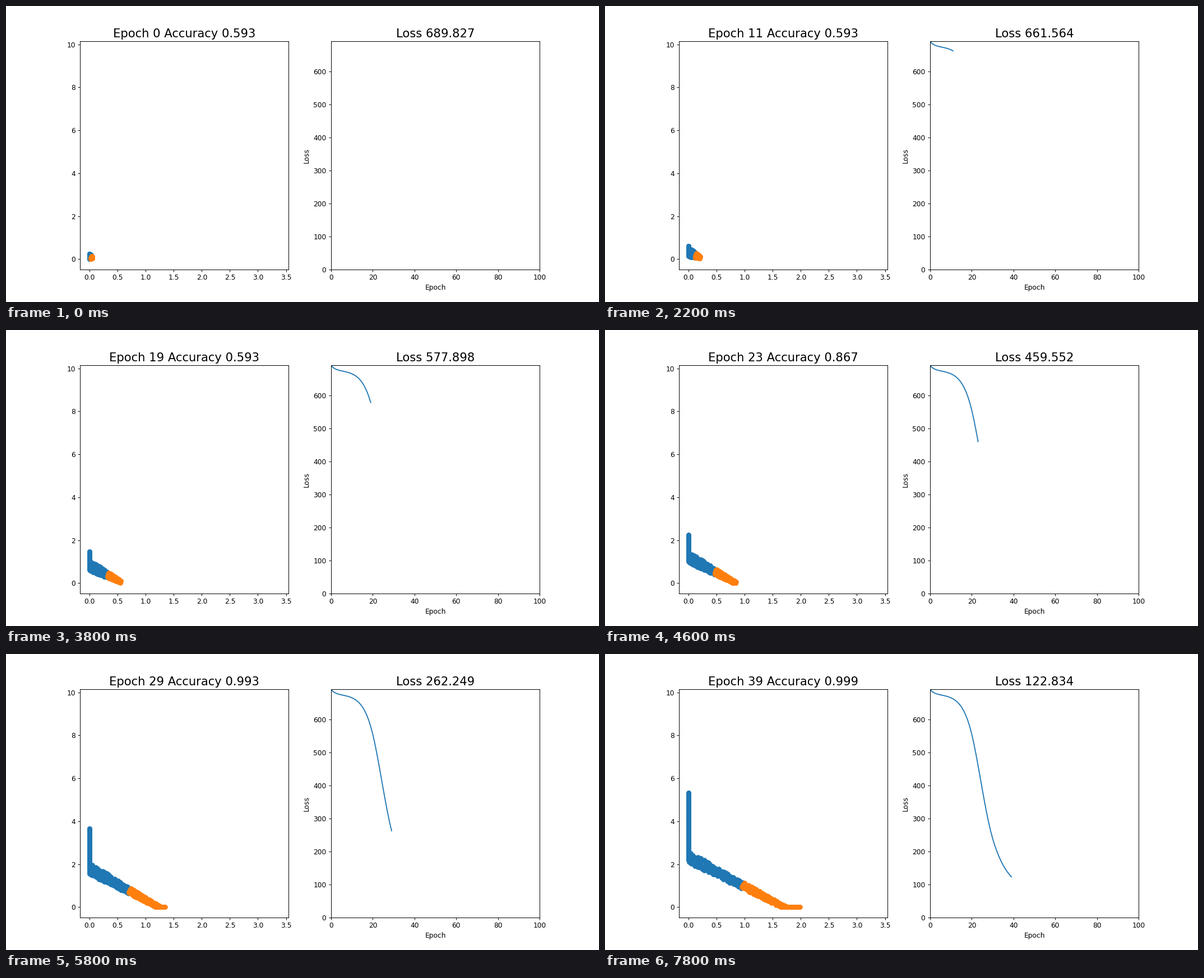
A matplotlib script that plays this animation: 1058 px wide and 529 px high, repeating every 8000 ms.

```python
import matplotlib.pyplot as plt
import numpy as np
from matplotlib.animation import FuncAnimation

EPOCHS = 40
N_BLUE, N_ORANGE = 593, 407
TITLE_SIZE = "xx-large"
FLOOR = 80  # level the loss sinks towards

plt.rcParams["font.family"] = "DejaVu Sans"


def smooth(keys, values, x):
    """Cubic Hermite interpolation through the given knots."""
    slopes = np.gradient(values, keys)
    i = np.clip(np.searchsorted(keys, x, side="right") - 1, 0, len(keys) - 2)
    h = keys[i + 1] - keys[i]
    t = (x - keys[i]) / h
    return ((1 + 2 * t) * (1 - t) ** 2 * values[i]
            + t * (1 - t) ** 2 * h * slopes[i]
            + t * t * (3 - 2 * t) * values[i + 1]
            + t * t * (t - 1) * h * slopes[i + 1])


def rise(epoch, height, middle, width):
    return height / (1 + np.exp((middle - epoch) / width))


def plateau(epoch):
    """Loss before the network starts to separate the classes."""
    return 675 + 15.5 * np.exp(-epoch / 2)


def loss_curve(epoch):
    # The drop is close to a logistic, so interpolate its logit.
    keys = np.array([0, 11, 19, 23, 29, 34, 39])
    values = np.array([689.827, 661.564, 577.898, 459.552,
                       262.249, 170.719, 122.834])
    share = (values - FLOOR) / (plateau(keys) - FLOOR)
    logit = smooth(keys, np.log(share / (1 - share)), epoch)
    return FLOOR + (plateau(epoch) - FLOOR) / (1 + np.exp(-logit))


epochs = np.arange(EPOCHS)
loss = loss_curve(epochs)
error = .407 * np.exp(-.1588 * np.maximum(epochs - 19, 0) ** 1.408)
accuracy = 1 - np.maximum(error, .055 / (epochs + 1))

# Position along the band (0 is the class boundary) and across it.
rng = np.random.default_rng(4)
along = np.concatenate([rng.random(N_BLUE) ** 1.1,
                        -.34 * rng.random(N_ORANGE) ** .8])
across = rng.uniform(-1, 1, along.size) * np.clip(.65 + 1.2 * along, .2, 1)


def hidden(epoch):
    """Two ReLU units: an affine image of the data, cut off at zero."""
    edge = rise(epoch, 1.06, 24.5, 6.6)
    thickness = .28 - .18 * np.exp(-epoch / 25)
    x = edge - (.02 + rise(epoch, 3.6, 28.5, 6.4)) * along + .02 * across
    y = (.05 + 1.02 * edge + (.04 + rise(epoch, 4.6, 27, 5.6)) * along
         + thickness * across)
    return np.maximum(np.column_stack([x, y]), 0)


fig, (ax_points, ax_loss) = plt.subplots(
    1, 2, figsize=(12, 6), dpi=529 / 6, gridspec_kw={"wspace": .203})

start = hidden(0)
blue = ax_points.scatter(*start[:N_BLUE].T, color="tab:blue")
orange = ax_points.scatter(*start[N_BLUE:].T, color="tab:orange")
ax_points.set_xlim(-.169, 3.549)
ax_points.set_ylim(-.483, 10.138)
points_title = ax_points.set_title("", fontsize=TITLE_SIZE)

curve, = ax_loss.plot([], [], color="tab:blue")
ax_loss.set_xlim(0, 100)
ax_loss.set_ylim(0, loss[0])
ax_loss.set_xlabel("Epoch")
ax_loss.set_ylabel("Loss")
loss_title = ax_loss.set_title("", fontsize=TITLE_SIZE)


def draw(epoch):
    points = hidden(epoch)
    blue.set_offsets(points[:N_BLUE])
    orange.set_offsets(points[N_BLUE:])
    curve.set_data(epochs[:epoch + 1], loss[:epoch + 1])
    points_title.set_text(f"Epoch {epoch} Accuracy {accuracy[epoch]:.3f}")
    loss_title.set_text(f"Loss {loss[epoch]:.3f}")
    return blue, orange, curve, points_title, loss_title


anim = FuncAnimation(fig, draw, frames=EPOCHS, init_func=lambda: draw(0),
                     interval=200, repeat=True, repeat_delay=0)
plt.show()
```
